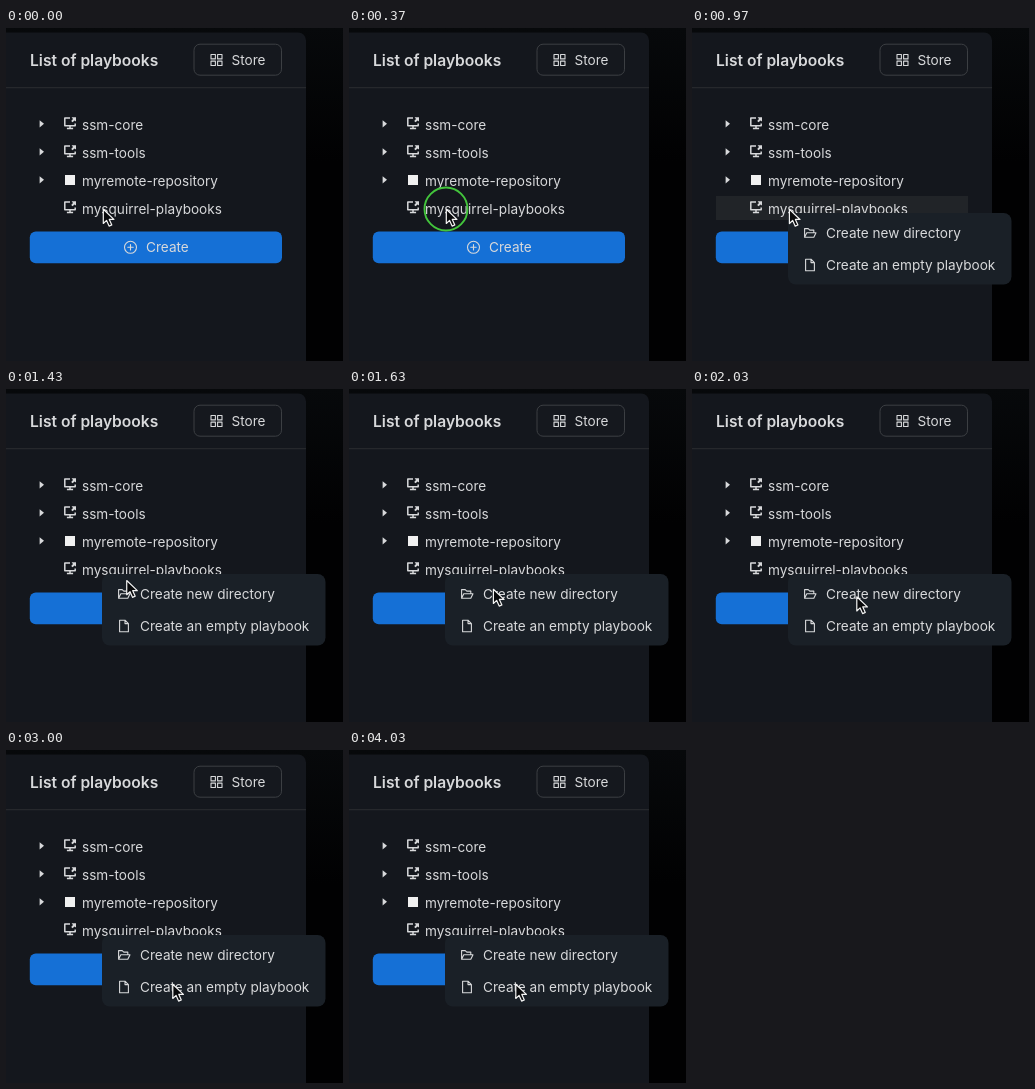
These frames come from a looping animation (337x333 px, 4.21 s). An HTML page:

```html
<!DOCTYPE html>
<html lang="en">
<head>
<meta charset="utf-8">
<title>Playbooks menu</title>
<style>
  html, body { margin: 0; width: 100%; height: 100%; overflow: hidden; background: #020304; }
  svg { display: block; }
  text { font: 13.6px Inter, "Liberation Sans", sans-serif; fill: #d8d9db; }
  .title { font-size: 15.6px; font-weight: 600; }
  .line { fill: none; stroke: #d8d9db; stroke-width: 1.1; stroke-linejoin: round; stroke-linecap: round; }
</style>
</head>
<body>
<svg width="337" height="333" viewBox="0 0 337 333">
  <defs>
    <g id="screen">
      <path fill="none" stroke="#d8d9db" stroke-width="1.5" stroke-linejoin="round" d="M7 1.9H1.8V9.8H12.2V7.4M7 9.8V12.3M3.9 12.6H10.1"/>
      <path fill="#d8d9db" d="M8.6 1.2H13V5.6L11.5 4.4L9.6 6.3L8.2 4.9L10 3z"/>
    </g>
    <path id="caret" fill="#d8d9db" d="M33.6 -3.8L38 -.2L33.6 3.4z"/>
    <linearGradient id="dusk" x2="0" y2="1">
      <stop stop-color="#07090b"/>
      <stop offset=".4" stop-color="#010102"/>
    </linearGradient>
  </defs>

  <rect width="337" height="333" fill="url(#dusk)"/>
  <path d="M0 4.4H292a8 8 0 0 1 8 8V333H0z" fill="#14171d"/>
  <path d="M0 59.7H300" stroke="#2a2d31"/>

  <text class="title" x="24" y="37.6">List of playbooks</text>
  <rect x="188" y="16.2" width="87.5" height="31" rx="6" fill="#15181e" stroke="#3c3f43"/>
  <path class="line" d="M205 26.5h4.4v4.4h-4.4zM211.6 26.5h4.4v4.4h-4.4zM205 33.1h4.4v4.4h-4.4zM211.6 33.1h4.4v4.4h-4.4z"/>
  <text x="225.5" y="37.2">Store</text>

  <rect id="row" x="24" y="168" width="252" height="24" fill="#212428"/>
  <use href="#caret" y="96"/>
  <use href="#caret" y="124"/>
  <use href="#caret" y="152"/>
  <use href="#screen" x="57" y="88"/>
  <use href="#screen" x="57" y="116"/>
  <rect x="59" y="147" width="10" height="10" fill="#f0f0f0"/>
  <use href="#screen" x="57" y="172"/>
  <text x="76" y="101.5">ssm-core</text>
  <text x="76" y="129.5">ssm-tools</text>
  <text x="76" y="157.5">myremote-repository</text>
  <text x="76" y="185.5">mysquirrel-playbooks</text>

  <rect x="23.8" y="203.6" width="252.2" height="31.7" rx="6" fill="#1570d6"/>
  <path class="line" d="M118.5 219.3a6 6 0 1 0 12 0a6 6 0 1 0 -12 0M121.8 219.3h5.4M124.5 216.6v5.4"/>
  <text x="140" y="224.2">Create</text>

  <g id="menu">
    <rect x="96" y="185" width="223.5" height="71.5" rx="8" fill="#1a2027"/>
    <path class="line" d="M112.6 209.2V200.6h3.6l1.6 1.5h4v2.6M112.6 209.2l2.2-4.5h9.2l-2.2 4.5z"/>
    <path class="line" d="M113.6 231.2h5.4l3.4 3.4v8.2h-8.8zM119 231.2v3.4h3.4"/>
    <text x="134" y="210">Create new directory</text>
    <text x="134" y="242">Create an empty playbook</text>
  </g>

  <circle id="ring" cx="97" cy="181" fill="none" stroke="#43c53c" stroke-width="1.9"/>
  <path id="cursor" d="M0 0V14.2L3.3 11.1L5.8 16.8L8.5 15.6L6 10.1H10.6z" fill="#08090b" stroke="#f4f4f4" stroke-width="1.2" stroke-linejoin="round"/>
</svg>
<script>
  const LOOP = 4210;
  const [row, menu, ring, cursor] = ["row", "menu", "ring", "cursor"].map(id => document.getElementById(id));
  const part = (t, from, to) => Math.min(1, Math.max(0, (t - from) / (to - from)));
  const smooth = p => p * p * (3 - 2 * p);
  const easeOut = (p, power) => 1 - (1 - p) ** power;

  // start, end, dx, dy
  const moves = [
    [950, 1480, 24, 10.5],
    [1480, 1770, 43.5, 16],
    [2310, 2830, 1, 26.5],
    [2910, 3000, 1, 0]
  ];

  function draw(t) {
    let x = 97.3, y = 181.3;
    for (const [from, to, dx, dy] of moves) {
      const p = smooth(part(t, from, to));
      x += dx * p;
      y += dy * p;
    }
    cursor.setAttribute("transform", `translate(${x} ${y})`);

    ring.setAttribute("r", 21.5 * easeOut(part(t, 20, 370), 2));
    ring.setAttribute("opacity", t < 20 ? 0 : 1 - part(t, 390, 510));

    const open = easeOut(part(t, 485, 715), 5);
    menu.setAttribute("opacity", open);
    menu.setAttribute("transform", `translate(0 185) scale(1 ${0.8 + 0.2 * open}) translate(0 -185)`);

    row.setAttribute("opacity", part(t, 485, 560) * (1 - part(t, 1080, 1300)));
  }

  function tick() {
    draw(performance.now() % LOOP);
    requestAnimationFrame(tick);
  }
  tick();
</script>
</body>
</html>
```
